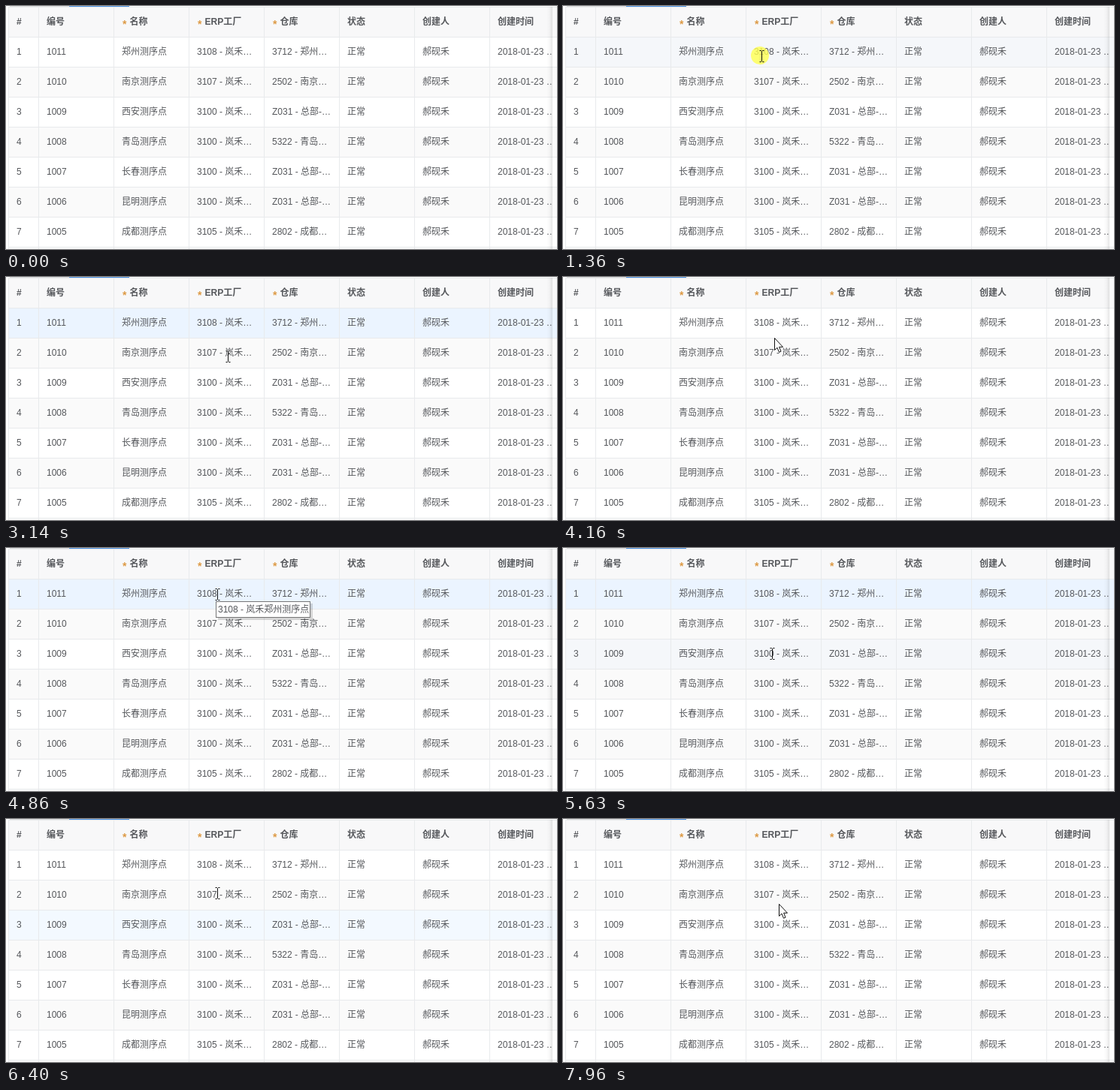
Write an HTML page that moves like this. It is 733 by 324 pixels and loops after 8000 ms.

```html
<!DOCTYPE html>
<html lang="zh-CN">
<head>
<meta charset="utf-8">
<style>
  html, body { margin: 0; width: 100%; height: 100%; overflow: hidden; background: #fff; }
  svg { display: block; width: 733px; height: 324px; }
  text { font: 12px "Liberation Sans", "Noto Sans CJK SC", "Noto Sans CJK", sans-serif; fill: #56585c; white-space: pre; }
  .head { font-weight: 700; }
  .star { font-size: 14px; font-weight: 700; fill: #dd9a45; }
  rect { shape-rendering: crispEdges; }
</style>
</head>
<body>
<svg id="stage" viewBox="0 0 733 324">
  <defs>
    <linearGradient id="fade">
      <stop offset="0" stop-color="#000" stop-opacity="0"/>
      <stop offset=".5" stop-color="#000" stop-opacity=".025"/>
      <stop offset="1" stop-color="#000" stop-opacity=".1"/>
    </linearGradient>
    <clipPath id="scrollArea"><rect width="727" height="324"/></clipPath>
  </defs>
  <g id="fills"></g>
  <g id="cells" clip-path="url(#scrollArea)"></g>
  <rect x="719" y="1" width="8" height="323" fill="url(#fade)"/>
  <g id="tip">
    <rect x="3" y="3" width="126" height="22" fill="#000" opacity=".15"/>
    <rect x=".5" y=".5" width="125" height="21" fill="#fff" stroke="#767676"/>
    <text x="3" y="15"></text>
  </g>
  <circle id="spot" r="12" fill="#ffff50" opacity=".8"/>
  <path id="arrow" d="M.5 .5V16.5L4 13.2 6.5 19.3 9 18.2 6.6 12.3H11.5Z" fill="#fff" stroke="#111" stroke-linejoin="round"/>
  <path id="beam" d="M-3-7.5h2l1 1 1-1h2M0-6.5V6.5M-3 7.5h2l1-1 1 1h2" fill="none" stroke="#111"/>
</svg>
<script>
const LOOP = 8000, ROW = 40, TOP = 41;
const HOVER = '#f5f7fa', CURRENT = '#ebf4ff', FADING = '#f3f9ff';
const $ = id => document.getElementById(id);

function add(parent, tag, attrs, content = '') {
  const el = document.createElementNS('http://www.w3.org/2000/svg', tag);
  for (const key in attrs) el.setAttribute(key, attrs[key]);
  el.textContent = content;
  return parent.appendChild(el);
}
const box = (x, y, width, height, fill) => add($('fills'), 'rect', { x, y, width, height, fill });
const label = (x, y, str, cls = '') => add($('cells'), 'text', { x, y, class: cls }, str);

// Table
const columns = [14, 54, 154, 254, 354, 454, 554, 654];
const titles = ['#', '编号', '*名称', '*ERP工厂', '*仓库', '状态', '创建人', '创建时间'];
const sites = [
  ['郑州', 3108, '3712 - 郑州'], ['南京', 3107, '2502 - 南京'], ['西安', 3100, 'Z031 - 总部-'],
  ['青岛', 3100, '5322 - 青岛'], ['长春', 3100, 'Z031 - 总部-'], ['昆明', 3100, 'Z031 - 总部-'],
  ['成都', 3105, '2802 - 成都']
];
const baseFill = i => i % 2 ? '#fafafa' : '#fff';

box(5, 0, 79, 1, '#dcdcdc');
box(84, 0, 80, 1, '#4a90e2');
box(3, 1, 730, 40, '#f8f8f9');
const rows = Array.from({ length: 8 }, (_, i) => box(3, TOP + i * ROW, 730, ROW, baseFill(i)));
for (let y = 1; y < 324; y += ROW) box(3, y, 730, 1, '#e8eaec');
for (const x of columns) box(x - 11, 1, 1, 323, '#e8eaec');

titles.forEach((title, c) => {
  const required = title[0] === '*';
  if (required) label(columns[c] + 1, 29, '*', 'star');
  label(columns[c] + (required ? 10.5 : 0), 25, title.replace('*', ''), 'head');
});
sites.forEach(([city, plant, store], i) => {
  const values = [i + 1, 1011 - i, city + '测序点', plant + ' - 岚禾…', store + '…', '正常', '郝砚禾', '2018-01-23 …'];
  values.forEach((value, c) => label(columns[c], 65 + i * ROW, value));
});

// Pointer: start, end, number of steps, destination
const entry = [300, 322];
const moves = [
  [120, 900, 11, 262, 66], [1770, 1990, 4, 318, 185], [2140, 2770, 9, 293, 105],
  [4160, 4160, 1, 281, 81], [4235, 4310, 2, 279, 61], [5090, 5400, 5, 276, 140],
  [6100, 6250, 3, 279, 98], [7180, 7340, 3, 282, 60], [7570, 7960, 6, 287, 113]
];
const clicks = [[1360, 1450], [3060, 3140], [4470, 4540], [5550, 5630], [6250, 6400]];
const selections = [
  [1530, 3300, 0, CURRENT], [4620, 5800, 0, CURRENT],
  [5800, 6400, 2, CURRENT], [6400, 6570, 2, FADING]
];
const tips = [[4780, 0], [5800, 2], [6570, 1]];
const TIP_STEP = 70, tipOpacity = [.5, 1, .5];

const within = (t, [from, to]) => t >= from && t < to;
const ease = p => p * p * (3 - 2 * p);

function pointerAt(t) {
  let [x, y] = entry;
  for (const [start, end, steps, toX, toY] of moves) {
    if (t < start) break;
    const step = t >= end ? steps : Math.floor((t - start) / (end - start) * (steps - 1) + 1e-6) + 1;
    const p = ease(step / steps);
    x += (toX - x) * p;
    y += (toY - y) * p;
  }
  return [Math.round(x), Math.round(y)];
}

function place(el, visible, x, y) {
  el.style.display = visible ? '' : 'none';
  el.setAttribute('transform', `translate(${x} ${y})`);
}

function render(t) {
  const [x, y] = pointerAt(t);
  const inside = t >= moves[0][0];
  const hovered = inside ? Math.floor((y - TOP) / ROW) : -1;
  const selected = selections.find(s => within(t, s));

  // Striped rows keep their own background
  rows.forEach((row, i) => {
    let fill = baseFill(i);
    if (i % 2 === 0 && i === hovered) fill = HOVER;
    if (selected && selected[2] === i) fill = selected[3];
    row.setAttribute('fill', fill);
  });

  const overText = t >= 980 && x >= 254 && x < 316 && Math.abs(y - 61 - hovered * ROW) < 11;
  place($('spot'), clicks.some(c => within(t, c)), x, y);
  place($('arrow'), inside && !overText, x, y);
  place($('beam'), inside && overText, x + 2.5, y + 1);

  const tip = tips.find(([start]) => within(t, [start, start + TIP_STEP * tipOpacity.length]));
  place($('tip'), tip, x, y + 10);
  if (tip) {
    const [city, plant] = sites[tip[1]];
    $('tip').setAttribute('opacity', tipOpacity[Math.floor((t - tip[0]) / TIP_STEP)]);
    $('tip').lastElementChild.textContent = `${plant} - 岚禾${city}测序点`;
  }
}

const origin = performance.now();
function tick() {
  render((performance.now() - origin) % LOOP);
  requestAnimationFrame(tick);
}
tick();
</script>
</body>
</html>
```
